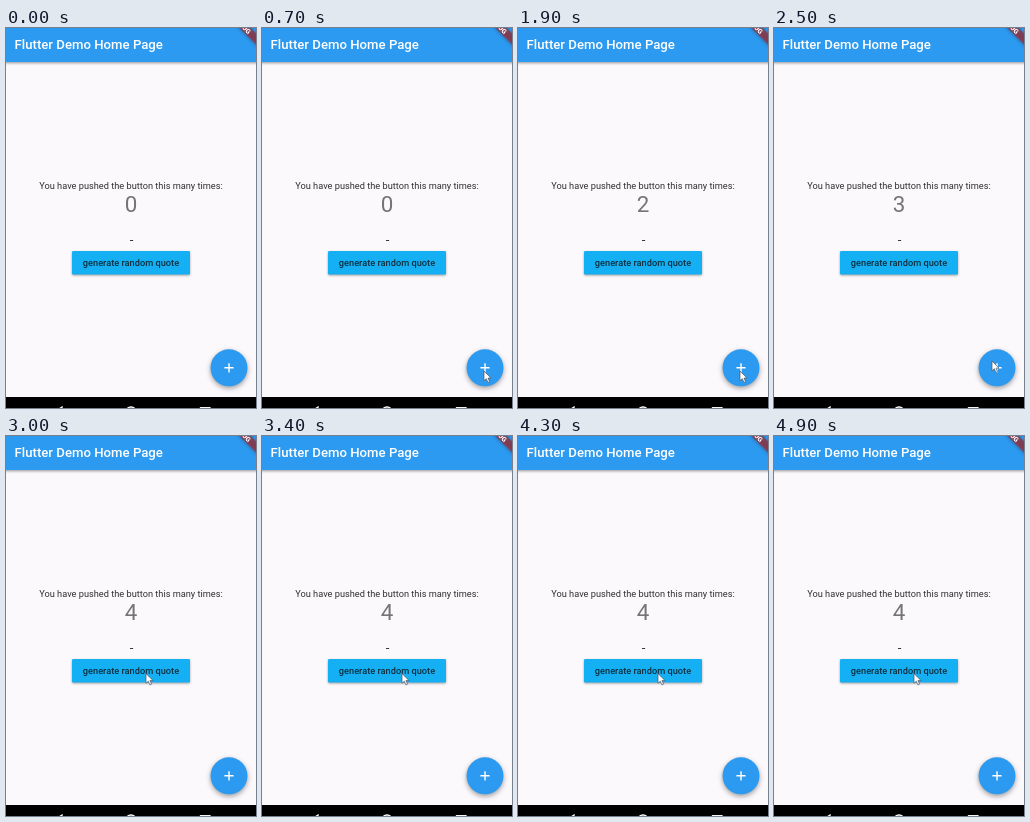
Write an HTML page that moves like this. It is 250 px wide and 380 px high and loops after 5 s.

```html
<!DOCTYPE html>
<html lang="en">
<head>
<meta charset="utf-8">
<title>Counter demo</title>
<style>
html, body { margin: 0; width: 100%; height: 100%; overflow: hidden; background: #fbf9fc; }
svg { display: block; width: 250px; height: 380px; font-family: Roboto, sans-serif; }
text { fill: #303032; font-size: 9.22px; }
.mid { text-anchor: middle; }
.medium { font-weight: 500; }
#title { fill: #fff; font-size: 13.18px; }
#count { fill: #757476; font-size: 22.4px; }
#quote { font-size: 13.18px; }
#label { fill: #0e3040; }
#bar { filter: drop-shadow(0 1.3px 1.5px rgba(0, 0, 0, .42)); }
#button { filter: drop-shadow(0 1px 1px rgba(0, 0, 0, .36)); }
#fab { filter: drop-shadow(0 2.4px 2.6px rgba(0, 0, 0, .38)); }
#ribbon rect { fill: rgba(183, 28, 28, .63); filter: drop-shadow(0 0 2px rgba(0, 0, 0, .45)); }
#ribbon text { fill: #fff; font-size: 6.7px; font-weight: 900; }
</style>
</head>
<body>
<svg viewBox="0 0 250 380">
  <rect width="250" height="380" fill="#fbf9fc"/>

  <rect id="bar" x="-10" y="-10" width="270" height="44" fill="#2c9af0"/>
  <text id="title" class="medium" x="8.6" y="20.8">Flutter Demo Home Page</text>
  <g id="ribbon" transform="translate(252 -18.7) rotate(45)">
    <rect x="-26.4" y="18.5" width="52.8" height="7.9"/>
    <text class="mid" y="24.8">DEBUG</text>
  </g>

  <text class="mid" x="125" y="161">You have pushed the button this many times:</text>
  <text id="count" class="mid" x="125" y="184">0</text>
  <text id="quote" class="mid" x="125.6" y="215.8">-</text>

  <rect id="button" x="66" y="223" width="118" height="23.5" rx="1.3" fill="#14b0f3"/>
  <text id="label" class="mid medium" x="125" y="238">generate random quote</text>

  <circle id="fab" cx="223" cy="339.8" r="18.5" fill="#2c9af0"/>
  <path d="M218.4 339.8h9.2M223 335.2v9.2" stroke="#fff" stroke-width="1.4"/>

  <rect y="369" width="250" height="11" fill="#000"/>
  <g fill="none" stroke="#fff" stroke-width="1.3">
    <path d="M56 379L47 384.8L56 390.6Z"/>
    <circle cx="125" cy="384.8" r="5.8"/>
    <rect x="194.5" y="379.7" width="9.5" height="10"/>
  </g>

  <path id="cursor" d="M0 0V9.8L2.3 7.7L3.9 11.4L5.6 10.7L4 7.1H7Z"
    fill="#fff" stroke="#4a5560" stroke-width=".7" stroke-linejoin="round"/>
</svg>
<script>
const LOOP = 5000, STEP = 100;
const count = document.getElementById('count');
const cursor = document.getElementById('cursor');

// Times at which the counter goes up
const taps = [1000, 1500, 2100, 2600];

// Pointer stops: time, x, y
const path = [
  [300, 254, 322],
  [700, 222, 343],
  [2400, 222, 343],
  [2500, 218, 333],
  [2900, 140, 237.5]
];

const ease = p => p * p * (3 - 2 * p);

function pointAt(t) {
  const i = path.findIndex(stop => stop[0] > t);
  if (i === 0) return path[0].slice(1);
  if (i < 0) return path[path.length - 1].slice(1);
  const [t0, x0, y0] = path[i - 1];
  const [t1, x1, y1] = path[i];
  const p = ease((t - t0) / (t1 - t0));
  return [x0 + (x1 - x0) * p, y0 + (y1 - y0) * p];
}

function draw(t) {
  const [x, y] = pointAt(t);
  count.textContent = taps.filter(tap => tap <= t).length;
  cursor.setAttribute('transform', `translate(${x} ${y})`);
  cursor.setAttribute('visibility', t < path[0][0] ? 'hidden' : 'visible');
}

const start = performance.now();
function tick() {
  const t = (performance.now() - start) % LOOP;
  draw(Math.floor(t / STEP) * STEP);
  requestAnimationFrame(tick);
}
draw(0);
requestAnimationFrame(tick);
</script>
</body>
</html>
```
